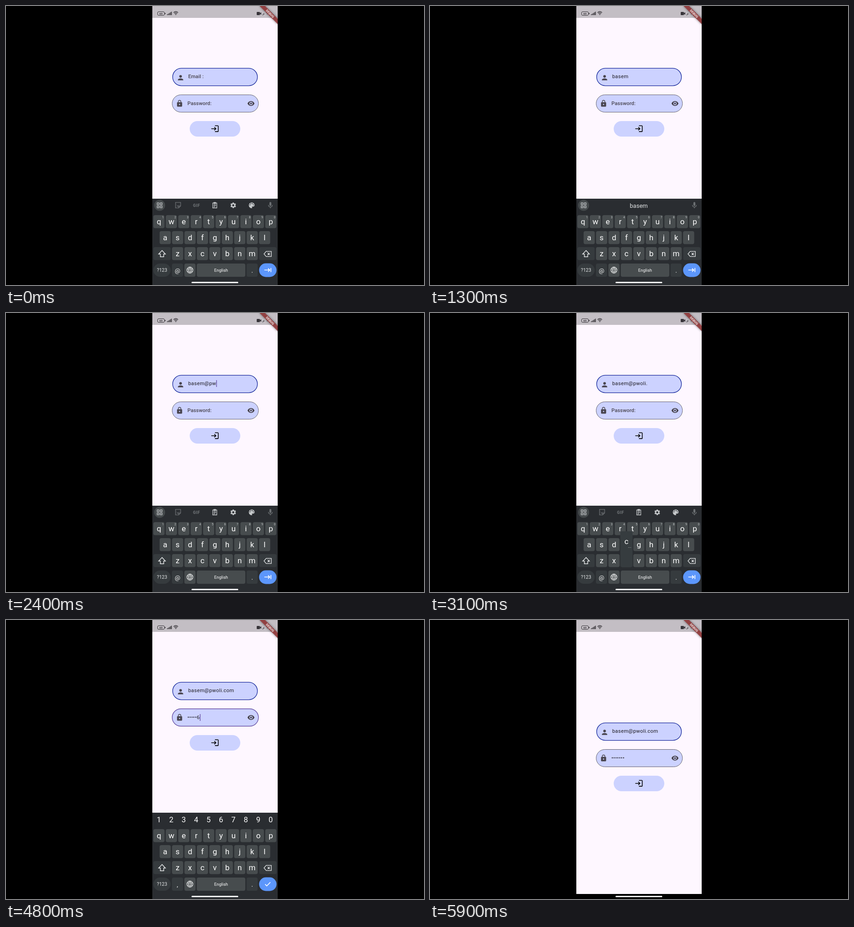
These frames come from a looping animation (917 by 611 pixels, 6000 ms). An HTML page with a canvas:

```html
<!DOCTYPE html>
<html lang="en">
<head>
<meta charset="utf-8">
<title>Login form</title>
<style>
html, body { margin: 0; height: 100%; overflow: hidden; background: #000; }
canvas { display: block; }
</style>
</head>
<body>
<canvas id="stage" width="917" height="611"></canvas>
<script>
const ctx = document.getElementById('stage').getContext('2d');
const LOOP = 6000, LEFT = 321, WIDTH = 275, KEY_TOP = 422, PAGE_END = 600;
const EMAIL = 'basem@pwoli.com', PASSWORD = '1234567';
const emailTimes = [300, 480, 680, 880, 1100, 1700, 2050, 2300, 2520, 2680, 2850, 3020, 3170, 3340, 3500];
const passwordTimes = [4000, 4170, 4320, 4470, 4620, 4760, 4950];
const FOCUS_PASSWORD = 3700, SUBMIT = 5200, HIDE_TIME = 300;
const color = { page: '#fef7ff', field: '#ccd2ff', icon: '#49454f', board: '#2a2d31',
  key: '#474c4e', fn: '#363b3e', light: '#c6c9cb', dim: '#6c7073', focus: '#6750a4' };

// Icons live in a 24-unit box.
const icons = {
  person: 'M12 12a4 4 0 1 0 0-8 4 4 0 0 0 0 8zm0 2c-2.67 0-8 1.34-8 4v2h16v-2c0-2.66-5.33-4-8-4z',
  lock: 'M18 8h-1V6A5 5 0 0 0 7 6v2H6a2 2 0 0 0-2 2v10a2 2 0 0 0 2 2h12a2 2 0 0 0 2-2V10a2 2 0 0 0-2-2zm-6 9a2 2 0 1 1 0-4 2 2 0 0 1 0 4zm3.1-9H8.9V6a3.1 3.1 0 0 1 6.2 0z',
  eye: 'M12 4.5C7 4.5 2.73 7.61 1 12c1.73 4.39 6 7.5 11 7.5s9.27-3.11 11-7.5c-1.73-4.39-6-7.5-11-7.5zM12 17a5 5 0 1 1 0-10 5 5 0 0 1 0 10zm0-8a3 3 0 1 0 0 6 3 3 0 0 0 0-6z',
  login: 'M11 7L9.6 8.4l2.6 2.6H2v2h10.2l-2.6 2.6L11 17l5-5zm9 12h-8v2h8a2 2 0 0 0 2-2V5a2 2 0 0 0-2-2h-8v2h8z',
  mic: 'M12 14a3 3 0 0 0 3-3V5a3 3 0 0 0-6 0v6a3 3 0 0 0 3 3zm5-3a5 5 0 0 1-10 0H5a7 7 0 0 0 6 6.92V21h2v-3.08A7 7 0 0 0 19 11z',
  palette: 'M12 3a9 9 0 0 0 0 18 1.5 1.5 0 0 0 1.1-2.5 1.5 1.5 0 0 1 1.1-2.5H16a5 5 0 0 0 5-5c0-4.4-4-8-9-8zM6.5 12a1.5 1.5 0 1 1 0-3 1.5 1.5 0 0 1 0 3zm3-4a1.5 1.5 0 1 1 0-3 1.5 1.5 0 0 1 0 3zm5 0a1.5 1.5 0 1 1 0-3 1.5 1.5 0 0 1 0 3zm3 4a1.5 1.5 0 1 1 0-3 1.5 1.5 0 0 1 0 3z',
  grid: 'M4 4h6v6H4zM14 4h6v6h-6zM4 14h6v6H4zM14 14h6v6h-6z',
  sticker: 'M4 3h16v11l-6 6H4zM20 14h-6v6M8 8v1M15 8v1M8 13q3 3 6 0',
  clipboard: 'M5 4h14v17H5zM9 2h6v4H9zM8 10h8M8 13.5h8M8 17h5',
  teeth: 'M12 3v18M4.2 7.5l15.6 9M4.2 16.5l15.6-9',
  globe: 'M12 3a9 9 0 1 0 0 18 9 9 0 0 0 0-18zM12 3c-5 5-5 13 0 18 5-5 5-13 0-18M4 9h16M4 15h16',
  shift: 'M12 3L3 12.5h4.5V20h9v-7.5H21z',
  erase: 'M8 5h14v14H8l-6-7zM12 9l6 6M18 9l-6 6',
  next: 'M2 12h16M13 7l5 5-5 5M21.5 6v12',
  check: 'M4 12.5l5 5L20 6.5',
  wifi: 'M2 9q10-9 20 0M5.5 13q6.5-6 13 0M9 17q3-3 6 0M12 20v1'
};
for (const name in icons) icons[name] = new Path2D(icons[name]);

function icon(name, x, y, scale, paint, line) {
  ctx.save();
  ctx.translate(x, y);
  ctx.scale(scale, scale);
  ctx.translate(-12, -12);
  ctx.fillStyle = ctx.strokeStyle = paint;
  ctx.lineWidth = line;
  if (line) ctx.stroke(icons[name]); else ctx.fill(icons[name]);
  ctx.restore();
}

function box(x, y, w, h, r, fill, stroke, line) {
  ctx.beginPath();
  ctx.roundRect(x, y, w, h, r);
  if (fill) { ctx.fillStyle = fill; ctx.fill(); }
  if (stroke) { ctx.strokeStyle = stroke; ctx.lineWidth = line; ctx.stroke(); }
}

function text(str, x, y, size, paint, { align = 'center', weight = 400, spacing = 0, family = 'Roboto' } = {}) {
  ctx.font = `${weight} ${size}px ${family}, sans-serif`;
  ctx.letterSpacing = spacing + 'px';
  ctx.textAlign = align;
  ctx.fillStyle = paint;
  ctx.fillText(str, x, y);
  return ctx.measureText(str).width;
}

function statusBar() {
  const ink = '#38353a';
  box(LEFT, 0, WIDTH, 26, 0, '#c3bec4');
  box(332.5, 12.5, 15, 8, 2.5, null, ink, 1);
  box(348.5, 15, 1.5, 3, 0.5, ink);
  text('65', 340, 19, 6, ink, { weight: 700 });
  for (let i = 0; i < 5; i++) box(353.5 + i * 2.2, 18 - i * 1.4, 1.5, 2 + i * 1.4, 0, ink);
  icon('wifi', 372.5, 16, 0.5, ink, 2.6);
  box(550, 13, 7, 7, 1, ink);
  ctx.beginPath();
  ctx.moveTo(556, 16.5);
  ctx.lineTo(560, 13.5);
  ctx.lineTo(560, 19.5);
  ctx.fill();
  text('م', 565, 18.5, 8, ink, { family: 'DejaVu Sans' });
  text('١', 573, 19, 7, ink, { family: 'DejaVu Sans' });
}

function debugBanner() {
  ctx.save();
  ctx.beginPath();
  ctx.rect(LEFT, 0, WIDTH, PAGE_END);
  ctx.clip();
  ctx.translate(LEFT + WIDTH, 0);
  ctx.rotate(Math.PI / 4);
  ctx.shadowColor = '#0009';
  ctx.shadowBlur = 5;
  box(-28, 19.6, 56, 8.4, 0, '#963c3ee6');
  ctx.shadowColor = 'transparent';
  text('DEBUG', 0, 26.3, 7.1, '#eadcdc', { weight: 900 });
  ctx.restore();
}

function fieldText(value, label, x, y, cursorOn) {
  const style = { align: 'left', spacing: 0.35 };
  let width = 0;
  if (value) width = text(value, x, y, 11.2, '#1d1b20', style);
  else text(label, x, y, 11.2, color.icon, { align: 'left', weight: 500, spacing: 0.05 });
  if (cursorOn) box(x + width, y - 11, 1.4, 15, 0, color.focus);
}

function form(t, email, shift) {
  const onPassword = t >= FOCUS_PASSWORD && t < SUBMIT;
  const blink = start => (t - start + LOOP) % 1000 < 500;
  let password = '';
  const typed = passwordTimes.filter(at => at <= t).length;
  if (typed) {
    password = '•'.repeat(typed - 1) + (onPassword ? PASSWORD[typed - 1] : '•');
  }
  ctx.save();
  ctx.translate(0, shift);
  box(365.6, 136.4, 186, 38.2, 19.1, color.field, '#15269a', 1.3);
  icon('person', 383, 157, 0.73, color.icon);
  fieldText(email, 'Email :', 399.7, 158, t < FOCUS_PASSWORD && blink(400));
  box(364.6, 194.5, 189.2, 38, 19, color.field, onPassword ? color.focus : '#65626c', onPassword ? 1.4 : 1);
  icon('lock', 380.8, 213.5, 0.7, color.icon);
  icon('eye', 537.5, 213.5, 0.7, color.icon);
  fieldText(password, 'Password:', 398, 217, onPassword && blink(700));
  box(403, 252, 111, 34, 17, color.field);
  icon('login', 458.4, 268.7, 0.8, '#000');
  ctx.restore();
}

const rows = [['qwertyuiop', 335.5, 458], ['asdfghjkl', 349.2, 493], ['zxcvbnm', 376.4, 528]];
const PITCH = 27.27, KEY_W = 24.5, KEY_H = 28.5;

function toolbar() {
  icon('sticker', 377.5, 436.5, 0.7, color.dim, 1.9);
  text('GIF', 418, 440, 9, color.dim, { weight: 900, spacing: 0.5 });
  icon('clipboard', 458, 436.5, 0.64, color.light, 2);
  icon('teeth', 498.5, 436.5, 0.68, color.light, 4.5);
  box(493.7, 431.7, 9.6, 9.6, 4.8, color.light);
  box(496.3, 434.3, 4.4, 4.4, 2.2, color.board);
  icon('palette', 539, 436.5, 0.7, color.light);
}

function keyPreview(letter) {
  for (const [letters, x, y] of rows) {
    const i = letters.indexOf(letter);
    if (i < 0) continue;
    const cx = x + i * PITCH;
    box(cx - 13.5, y - 50, 27, 78.5, 4, '#363c3f');
    text(letter, cx, y - 22, 17, '#fff');
    text('...', cx + 7, y - 14, 9, '#ddd');
  }
}

function keyboard(t, email, drop) {
  const numeric = t >= FOCUS_PASSWORD;
  ctx.save();
  ctx.beginPath();
  ctx.rect(LEFT, 0, WIDTH, drop ? PAGE_END : 611);
  ctx.clip();
  ctx.translate(0, drop);
  box(LEFT, KEY_TOP, WIDTH, 190, 0, color.board);
  if (numeric) {
    [...'1234567890'].forEach((d, i) => text(d, 335.3 + i * PITCH, 443, 16.5, '#fff'));
  } else {
    box(325, 424.5, 24, 24, 12, '#464b4d');
    icon('grid', 337, 436.5, 0.68, color.light, 1.8);
    if (email && !email.includes('@')) text(email, 458, 441.5, 13, '#e3e5e6');
    else toolbar();
    icon('mic', 580, 436.5, 0.72, color.dim);
  }
  rows.forEach(([letters, x, y], row) => [...letters].forEach((letter, i) => {
    const cx = x + i * PITCH;
    box(cx - KEY_W / 2, y, KEY_W, KEY_H, 4, color.key);
    text(letter, cx, y + 20, 17, '#fff');
    if (row === 0 && !numeric) text((i + 1) % 10, cx + 8.5, y + 7.3, 6.5, color.light);
  }));
  box(323.3, 528, 38, KEY_H, 4, color.fn);
  icon('shift', 342.3, 542.8, 0.82, '#e6e8e9', 1.8);
  box(555.5, 528, 38, KEY_H, 4, color.fn);
  icon('erase', 574, 543, 0.8, '#e6e8e9', 1.7);

  box(323.3, 564, 38, 29, 14.5, color.fn);
  text('?123', 342.3, 582, 10.5, '#e6e8e9');
  box(364, 564, KEY_W, 29, 4, color.fn);
  text(numeric ? ',' : '@', 376.2, 584, 13.5, '#fff');
  box(391.3, 564, KEY_W, 29, 4, color.key);
  icon('globe', 403.5, 578.3, 0.74, '#f0f1f1', 1.5);
  box(418.5, 564, 106.5, 29, 4, color.key);
  text('English', 471.8, 581.7, 9.3, '#fff');
  box(527.7, 564, KEY_W, 29, 4, color.fn);
  text('.', 540, 584, 14, '#fff');
  box(555.2, 563.5, 38.3, 30, 15, '#5c96fb');
  icon(numeric ? 'check' : 'next', 574.2, 578.3, numeric ? 0.72 : 0.74, '#fff', 2.2);

  const pressed = emailTimes.findIndex(at => t >= at - 90 && t < at);
  if (pressed >= 0) keyPreview(EMAIL[pressed]);
  ctx.restore();
}

function draw() {
  const t = performance.now() % LOOP;
  const p = Math.min(1, Math.max(0, (t - SUBMIT) / HIDE_TIME));
  const drop = (PAGE_END - KEY_TOP) * p * p * (3 - 2 * p);
  const email = EMAIL.slice(0, emailTimes.filter(at => at <= t).length);
  ctx.fillStyle = '#000';
  ctx.fillRect(0, 0, 917, 611);
  box(LEFT, 0, WIDTH, PAGE_END, 0, color.page);
  statusBar();
  form(t, email, drop / 2);
  debugBanner();
  if (p < 1) keyboard(t, email, drop);
  box(407, 604, 102.5, 3, 1.5, '#fff');
  requestAnimationFrame(draw);
}
draw();
</script>
</body>
</html>
```
